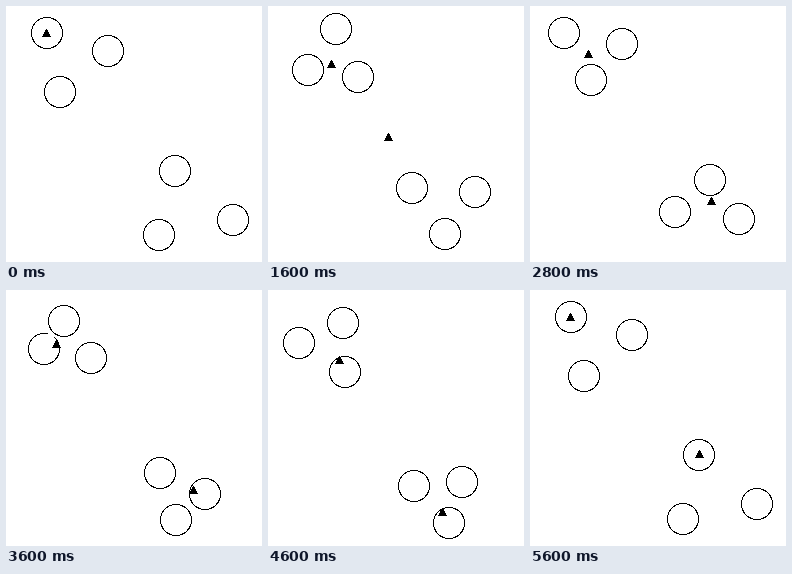
Animation of 256 by 256 pixels, one loop 5700 ms. Source, as an HTML page:

```html
<!DOCTYPE html>
<html lang="en">
<head>
<meta charset="utf-8">
<title>Two rotating groups</title>
<style>
  html, body { margin: 0; width: 100%; height: 100%; overflow: hidden; background: #fff; }
  svg { display: block; width: 100vw; height: 100vh; }
</style>
</head>
<body>
<svg id="stage" viewBox="0 0 256 256" shape-rendering="crispEdges"></svg>
<script>
const LOOP = 5700, STEP = 200, LAST = 28;
const KEYS = [0, 5, 8, 14, 18, 23, LAST];

// Closed orbits: positions at the key steps, then extra points [step, x, y].
const orbits = [
  [[41, 27, 34, 57, 40, 64, 61, 74, 85, 68, 75, 33], [3, 31, 44], [24, 67, 25]],
  [[102, 45, 85, 26, 68, 23, 34, 27, 38, 59, 77, 82], [12, 44, 20], [16, 23, 44]],
  [[54, 86, 83, 89, 90, 71, 92, 38, 58, 31, 31, 53], [24, 31, 61]],
  [[169, 165, 199, 176, 207, 186, 209, 213, 170, 230, 146, 196], [12, 218, 203]],
  [[153, 229, 129, 195, 144, 182, 180, 174, 199, 204, 181, 233], [24, 175, 236]],
  [[227, 214, 193, 232, 177, 228, 145, 206, 154, 183, 194, 192], [4, 201, 234]]
].map(([flat, ...extra]) => [...timed(flat), ...extra].sort((a, b) => a[0] - b[0]));

const trails = [
  [40, 27, 76, 86, 63, 58, 58, 48, 50, 54, 71, 70, 40, 27],
  [40, 27, 88, 105, 120, 131, 181, 195, 187, 200, 174, 222, 169, 164]
].map(timed);

function timed(flat) {
  return KEYS.slice(0, flat.length / 2).map((t, i) => [t, flat[2 * i], flat[2 * i + 1]]);
}

function orbitAt(points, t) {
  const n = points.length;
  const at = i => {
    const turn = Math.floor(i / n), [s, x, y] = points[i - turn * n];
    return [s + turn * LAST, x, y];
  };
  let i = 0;
  while (at(i + 1)[0] <= t) i++;
  const slope = (j, axis) => {
    const a = at(j - 1), b = at(j), c = at(j + 1);
    const before = b[0] - a[0], after = c[0] - b[0];
    return ((b[axis] - a[axis]) / before * after +
            (c[axis] - b[axis]) / after * before) / (before + after);
  };
  const p = at(i), q = at(i + 1), h = q[0] - p[0], u = (t - p[0]) / h, v = 1 - u;
  return [1, 2].map(k => Math.round(
    v * v * (1 + 2 * u) * p[k] + u * u * (3 - 2 * u) * q[k] +
    h * u * v * (v * slope(i, k) - u * slope(i + 1, k))));
}

function trailAt(points, t) {
  let i = 0;
  while (i < points.length - 2 && points[i + 1][0] <= t) i++;
  const p = points[i], q = points[i + 1], u = (t - p[0]) / (q[0] - p[0]);
  return [1, 2].map(k => Math.round(p[k] + (q[k] - p[k]) * u));
}

function add(markup) {
  const g = document.createElementNS("http://www.w3.org/2000/svg", "g");
  g.innerHTML = markup;
  return document.getElementById("stage").appendChild(g);
}

const place = (node, x, y) => node.setAttribute("transform", `translate(${x} ${y})`);

// Each ring sits on an opaque white tile.
const rings = orbits.map(() => add(
  '<rect x="-16" y="-16" width="32" height="32" fill="#fff"/>' +
  '<circle r="15.5" fill="#fff" stroke="#000"/>'));
const markers = trails.map(() => add('<path d="M-4.5 4H4.5L.5-4H-.5Z"/>'));

function draw(now) {
  const t = Math.floor(now % LOOP / STEP);
  rings.forEach((ring, i) => place(ring, ...orbitAt(orbits[i], t)));
  markers.forEach((marker, i) => {
    const [x, y] = trailAt(trails[i], t);
    place(marker, x + 0.5, y);
  });
}

const start = performance.now();
function tick() {
  draw(performance.now() - start);
  requestAnimationFrame(tick);
}
tick();
</script>
</body>
</html>
```
